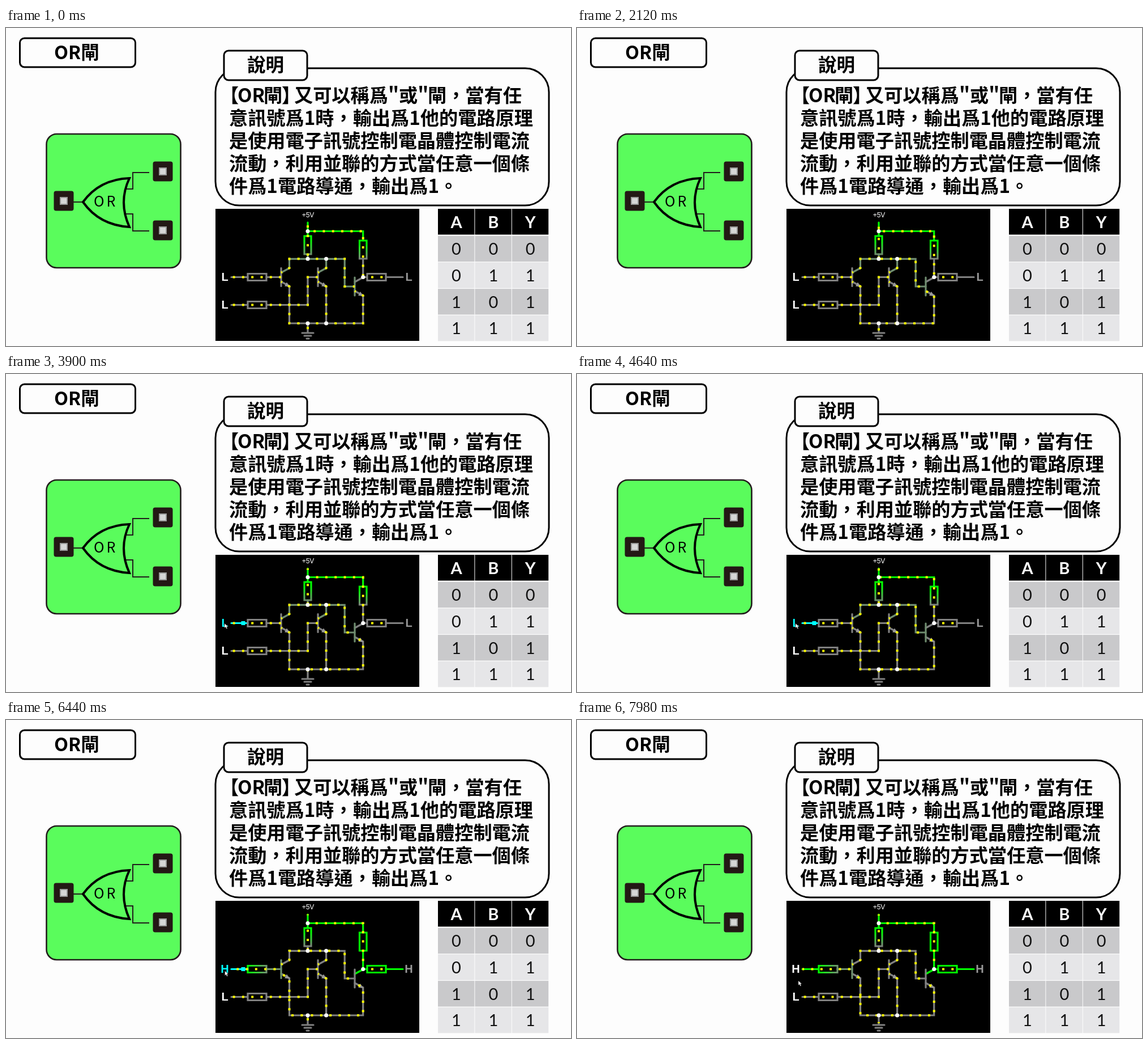
Write an HTML page that moves like this. It is 998x561 px and loops after 8000 ms.

```html
<!DOCTYPE html>
<html lang="zh-Hant">
<head>
<meta charset="utf-8">
<title>OR閘</title>
<style>
  html, body { margin: 0; width: 100%; height: 100%; overflow: hidden; background: #fdfdfd; }
  svg { display: block; width: 100%; height: 100%; }
  .cjk { font: 700 33.2px "Noto Sans CJK TC", "Noto Sans CJK", sans-serif; text-spacing-trim: space-all; }
  .box { fill: #fdfdfd; stroke: #000; stroke-width: 3; }
  .lines { fill: none; stroke: #221c1c; stroke-width: 2; }
  .table { font: 29px Lato, sans-serif; text-anchor: middle; }
  .logic { font: bold 20px "Liberation Sans", Arial, sans-serif; text-anchor: middle; }
  .wire { fill: none; stroke-width: 3.2; stroke-linecap: round; }
  .dots { fill: none; stroke: #ff0; stroke-width: 4; stroke-dasharray: 4 12.3; }
</style>
</head>
<body>
<svg id="stage" viewBox="0 0 998 561" preserveAspectRatio="none">
  <defs>
    <linearGradient id="gIn" gradientUnits="userSpaceOnUse" x1="427" x2="460">
      <stop style="stop-color:var(--in)"/><stop offset="1" style="stop-color:var(--base)"/>
    </linearGradient>
    <linearGradient id="gR1" gradientUnits="userSpaceOnUse" x1="0" x2="0" y1="367" y2="400">
      <stop offset=".2" stop-color="#0f0"/><stop offset="1" style="stop-color:var(--bus)"/>
    </linearGradient>
    <linearGradient id="gR2" gradientUnits="userSpaceOnUse" x1="0" x2="0" y1="375" y2="408">
      <stop offset=".2" stop-color="#0f0"/><stop offset="1" style="stop-color:var(--out)"/>
    </linearGradient>
  </defs>

  <rect class="box" x="24.5" y="18" width="204" height="51" rx="8"/>
  <text class="cjk" x="85" y="55" style="font-size:32.5px">OR閘</text>
  <rect class="box" x="370" y="71" width="589" height="242" rx="42"/>
  <rect class="box" x="385" y="40" width="147" height="52" rx="8"/>
  <text class="cjk" x="426" y="76.5" style="font-size:32.5px">說明</text>
  <g class="cjk">
    <text y="130.5"><tspan x="378">【</tspan><tspan x="409">OR</tspan><tspan x="455">閘</tspan><tspan x="487">】</tspan><tspan x="509">又可以稱爲"或"</tspan><tspan x="745">閘，當有任</tspan></text>
    <text x="394" y="170.5">意訊號爲1時，輸出爲1他的電路原理</text>
    <text x="394" y="210.5">是使用電子訊號控制電晶體控制電流</text>
    <text x="394" y="250.5">流動，利用並聯的方式當任意一個條</text>
    <text x="394" y="290.5">件爲1電路導通，輸出爲1。</text>
  </g>

  <rect x="71.5" y="187" width="237" height="236" rx="18" fill="#5afc5c" stroke="#221c1c" stroke-width="2.6"/>
  <path class="lines" d="M119 307H135M211 284H224V255H253M211 328H224V358H253"/>
  <path d="M136 307Q165 267 218 265Q198 307 218 351Q165 348 136 307Z" fill="#5afc5c" stroke="#000" stroke-width="4"/>
  <text x="155" y="315" font-size="25" font-weight="300" letter-spacing="4"
        font-family="Noto Sans CJK TC, Noto Sans CJK, sans-serif">OR</text>
  <g id="ports"></g>
  <g id="table" class="table"></g>

  <path d="M370 319H730V552H370Z"/>
  <text x="533.5" y="334" fill="#fff" font-size="12" text-anchor="middle" font-family="Liberation Sans, Arial, sans-serif">+5V</text>
  <g id="circuit"></g>
  <g class="logic">
    <text id="inA" x="386.5" y="445.5"></text>
    <text x="386.5" y="494.5" fill="#fff">L</text>
    <text id="outY" x="711.5" y="445.5" fill="#999"></text>
  </g>
  <path id="handle" d="M415.5 436h7v7h-7z" fill="#0ff"/>
  <path id="cursor" d="M0 0V8L2 6.3 3.5 9.5 5 8.8 3.6 5.8 6 5.5Z" fill="#fff" stroke="#333" stroke-width=".5"/>
</svg>
<script>
const $ = id => document.getElementById(id);
const stage = $('stage');
function add(parent, tag, attrs, text = '') {
  const el = document.createElementNS('http://www.w3.org/2000/svg', tag);
  for (const key in attrs) el.setAttribute(key, attrs[key]);
  el.textContent = text;
  return parent.appendChild(el);
}

for (const [x, y] of [[102, 305], [277, 253], [277, 357]]) {
  add($('ports'), 'rect', { x: x - 17.5, y: y - 17.5, width: 35, height: 35, rx: 4, fill: '#231815' });
  add($('ports'), 'rect', { x: x - 6, y: y - 6, width: 12, height: 12, fill: '#d6d6d6', stroke: '#999', 'stroke-width': 2 });
}

['ABY', '000', '011', '101', '111'].forEach((row, r) => {
  const y = r ? 320 + r * 46.7 : 319;
  [...row].forEach((char, c) => {
    add($('table'), 'rect', { x: 763 + c * 65.4, y, width: 64.4, height: 45.5, fill: r ? (r % 2 ? '#c9c9cb' : '#e6e6e8') : '#000' });
    add($('table'), 'text', { x: 795.5 + c * 65.3, y: y + (r ? 33.5 : 34), fill: r ? '#111' : '#fff', 'font-weight': r ? 400 : 700 }, char);
  });
});

const circuit = $('circuit');
const GRAY = '#808080';
const wire = (d, color = GRAY) => add(circuit, 'path', { class: 'wire', d, style: `stroke:${color}` });

// Transistor with its base bar at (x, y)
function transistor(x, y, bar, collector) {
  wire(`M${x} ${y - 8}l14.7 -8`, collector);
  wire(`M${x} ${y + 8}l14.7 8`);
  wire(`M${x} ${y - 16}v32`, bar);
  add(circuit, 'path', { d: `M${x + 15} ${y + 17}l-9 -1 4 -7z`, fill: '#999' });
}

wire('M398 439.5H427', 'var(--lead)');
wire('M460 439.5H486', 'var(--base)');
wire('M427 433.5H460V445.5H427Z', 'url(#gIn)');
wire('M398 488.5H427M460 488.5H533V439.5H551M427 482.5H460V494.5H427Z');
wire('M533 343V367M533 358.5H630.7V375', '#0f0');
wire('M527 367H539V399H527Z', 'url(#gR1)');
wire('M624.5 375H637V407H624.5Z', 'url(#gR2)');
wire('M533 399V407.3M500.5 423.5V407.3H598.2V456H616M565.6 407.3V423.5', 'var(--bus)');
wire('M630.7 407V439.5H638M671 439.5H701M638 433.5H671V445.5H638Z', 'var(--out)');
wire('M500.5 456V521H630.7V472M565.6 456V521M533 521V537');
wire('M523 538H543M527 543H539M531 548H535');
transistor(486, 439.5, 'var(--base)', 'var(--bus)');
transistor(551, 439.5, GRAY, 'var(--bus)');
transistor(616, 456, 'var(--bus)', 'var(--out)');

// Path, position of the first dot, speed in px/s while the input is low and high
const flows = [
  ['M398 439.5H486', 4.6, 0, 57],
  ['M398 488.5H533V439.5H551', 4.6, 0, 0],
  ['M533 343V358.5', 7, 178, 64],
  ['M533 358.5V407.3', 8.5, 64, 64],
  ['M533 358.5H630.7V439.5', 12, 114, 0],
  ['M533 407.3H598.2V456H616', 0, 64, 0],
  ['M533 407.3H500.5V423.5L486 431.5', 0, 0, 64],
  ['M565.6 407.3V423.5L551 431.5', 0, 0, 0],
  ['M486 447.5L500.5 456V521H533', 16.3, 0, 121],
  ['M551 447.5L565.6 456V521', 16.3, 0, 0],
  ['M616 464L630.7 472V521H533', 16.3, 178, 0],
  ['M533 521V535', 8, 178, 121],
  ['M630.7 439.5H672', 16.3, 0, 0],
].map(([d, start, low, high]) => ({ el: add(circuit, 'path', { class: 'dots', d }), start, low, high }));

for (const [cx, cy] of [[533, 358.5], [533, 407.3], [565.6, 407.3], [630.7, 439.5], [533, 521], [565.6, 521]])
  add(circuit, 'circle', { cx, cy, r: 3.5, fill: '#fff' });

const LOOP = 8, SWITCH = 5.18, HOVER_START = 2.4, HOVER_END = 6.5;
const cursorKeys = [[2.2, 371, 444], [2.5, 384, 439], [3.1, 384, 439], [3.4, 386, 440], [6.4, 386, 440], [6.7, 391, 460], [8, 391, 460]];

function cursorAt(t) {
  const i = Math.max(1, cursorKeys.findIndex(key => key[0] > t));
  const [t0, x0, y0] = cursorKeys[i - 1], [t1, x1, y1] = cursorKeys[i];
  const k = (t - t0) / (t1 - t0);
  return [x0 + (x1 - x0) * k, y0 + (y1 - y0) * k];
}

function draw(now) {
  const t = now / 1000 % LOOP;
  const high = t >= SWITCH, hover = t >= HOVER_START && t < HOVER_END;
  const colors = {
    in: high ? '#0f0' : GRAY,
    lead: hover ? '#0ff' : high ? '#0f0' : GRAY,
    base: high ? '#6f916f' : GRAY,
    bus: high ? GRAY : '#6f8c6f',
    out: high ? '#0f0' : GRAY,
  };
  for (const name in colors) stage.style.setProperty('--' + name, colors[name]);

  $('inA').textContent = $('outY').textContent = high ? 'H' : 'L';
  $('inA').setAttribute('fill', hover ? '#0ff' : '#fff');
  $('handle').style.display = hover ? '' : 'none';
  $('cursor').style.display = t >= cursorKeys[0][0] ? '' : 'none';
  $('cursor').setAttribute('transform', `translate(${cursorAt(t)})`);

  for (const f of flows) {
    const travel = f.low * Math.min(t, SWITCH) + f.high * Math.max(0, t - SWITCH);
    f.el.style.strokeDashoffset = 2 - f.start - travel;
  }
  requestAnimationFrame(draw);
}
requestAnimationFrame(draw);
</script>
</body>
</html>
```
